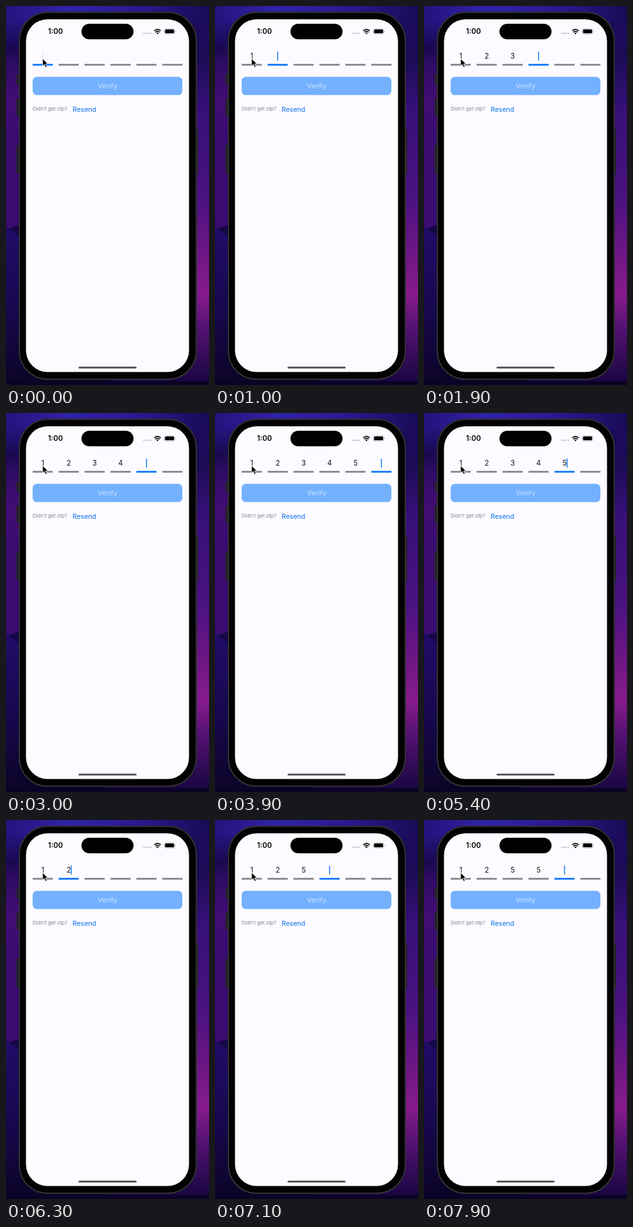
Write an HTML page that moves like this. It is 320 px wide and 598 px high and loops after 8 s.

```html
<!DOCTYPE html>
<html lang="en">
<head>
<meta charset="utf-8">
<title>Code entry</title>
<style>
html, body { margin: 0; width: 100%; height: 100%; overflow: hidden; background: #120638; }
svg { display: block; width: 320px; height: 598px; font-family: Inter, Roboto, sans-serif; }
.mid { text-anchor: middle; }
</style>
</head>
<body>
<svg viewBox="0 0 320 598">
  <defs>
    <linearGradient id="top">
      <stop offset="0" stop-color="#24127c"/>
      <stop offset=".3" stop-color="#3023a6"/>
      <stop offset=".65" stop-color="#2a1a91"/>
      <stop offset="1" stop-color="#190a55"/>
    </linearGradient>
    <linearGradient id="left" x2="0" y2="1">
      <stop offset="0" stop-color="#28188c"/>
      <stop offset=".1" stop-color="#211273"/>
      <stop offset=".19" stop-color="#1a0850"/>
      <stop offset=".25" stop-color="#2c0b62"/>
      <stop offset=".42" stop-color="#420d75"/>
      <stop offset=".59" stop-color="#3a0c70"/>
    </linearGradient>
    <linearGradient id="low" x2="0" y2="1">
      <stop offset="0" stop-color="#210c68"/>
      <stop offset=".5" stop-color="#18084f"/>
      <stop offset="1" stop-color="#0c0427"/>
    </linearGradient>
    <linearGradient id="right" x2="0" y2="1">
      <stop offset="0" stop-color="#1b0b5c"/>
      <stop offset=".14" stop-color="#1c0b56"/>
      <stop offset=".27" stop-color="#361078"/>
      <stop offset=".5" stop-color="#4a1280"/>
      <stop offset=".68" stop-color="#741786"/>
      <stop offset=".76" stop-color="#861b8c"/>
      <stop offset=".85" stop-color="#541273"/>
      <stop offset="1" stop-color="#16063f"/>
    </linearGradient>
  </defs>

  <rect width="320" height="598" fill="url(#low)"/>
  <path d="M0 0H160V300L0 352Z" fill="url(#left)"/>
  <path d="M0 348L24 366V598H0Z" fill="url(#low)"/>
  <rect x="160" width="160" height="598" fill="url(#right)"/>
  <rect width="320" height="26" fill="url(#top)"/>
  <rect y="592" width="320" height="6" fill="#0b0325"/>

  <g fill="#25222b">
    <rect x="16.5" y="108" width="5" height="16" rx="1.5"/>
    <rect x="16.5" y="146" width="5" height="27" rx="1.5"/>
    <rect x="16.5" y="219" width="5" height="45" rx="1.5"/>
    <rect x="298.5" y="194" width="4.5" height="72" rx="1.5"/>
  </g>
  <rect x="20" y="9" width="281" height="581" rx="45" fill="#171619"/>
  <rect x="21.2" y="10.2" width="278.6" height="578.6" rx="44" fill="#020203" stroke="#39383b" stroke-width="1.6"/>
  <rect x="31.5" y="21" width="257" height="556.5" rx="34" fill="#fdfbff"/>
  <rect x="119" y="28" width="82" height="24.5" rx="12.25" fill="#000"/>

  <text class="mid" x="78" y="44.2" font-size="11.3" font-weight="600">1:00</text>
  <g fill="#b9b8bc">
    <circle cx="217.6" cy="43.2" r="1.1"/>
    <circle cx="220.9" cy="43.2" r="1.1"/>
    <circle cx="224.2" cy="43.2" r="1.1"/>
    <circle cx="227.5" cy="43.2" r="1.1"/>
  </g>
  <g fill="none" stroke="#000" stroke-width="1.7">
    <path d="M233.6 39.2Q238.8 34.6 244 39.2"/>
    <path d="M235.4 41.3Q238.8 38.4 242.2 41.3"/>
  </g>
  <path d="M237 42.8Q238.8 41.4 240.6 42.8L238.8 44.8Z"/>
  <rect x="249.6" y="36" width="16.4" height="8.2" rx="2.6" fill="none" stroke="#99989c" stroke-width=".8"/>
  <rect x="250.7" y="37.1" width="14.2" height="6" rx="1.6"/>
  <path d="M267 38.8Q268.4 40.1 267 41.4Z" fill="#99989c"/>

  <g id="cells"></g>
  <rect id="caret" y="71.8" width="1.5" height="14.4" rx=".7" fill="#1478f5"/>

  <rect id="button" x="42" y="111.8" width="236" height="28.8" rx="6.5"/>
  <text id="verify" class="mid" x="160.2" y="130.2" font-size="10.9" font-weight="500">Verify</text>
  <text x="42" y="165.4" font-size="7.9" fill="#858488">Didn't get otp?</text>
  <text x="105" y="166.5" font-size="10.6" fill="#0870e8">Resend</text>
  <rect x="114.3" y="568.9" width="91.6" height="3" rx="1.5" fill="#59585b"/>

  <path d="M57.7 83V94.6L60.4 92.1L62.4 96.8L64.5 95.9L62.5 91.4H66.1Z" stroke="#fff" stroke-width=".8" stroke-linejoin="round"/>
</svg>
<script>
const LOOP = 8000, CELLS = 6, PITCH = 40.88;
// [time, entered digits, whether the caret stays behind the last digit]
const steps = [
  [-680, ''], [700, '1'], [1200, '12'], [1700, '123'], [2500, '1234'],
  [3400, '12345'], [4100, '123456', true],
  [5100, '12345', true], [5600, '1234', true], [5900, '123', true], [6200, '12', true],
  [6900, '125'], [7400, '1255']
];
const el = id => document.getElementById(id);
const add = (tag, attrs) => {
  const node = document.createElementNS('http://www.w3.org/2000/svg', tag);
  for (const key in attrs) node.setAttribute(key, attrs[key]);
  return el('cells').appendChild(node);
};
const center = i => 58 + i * PITCH;
const cells = Array.from({ length: CELLS }, (_, i) => ({
  digit: add('text', { class: 'mid', x: center(i), y: 83.4, 'font-size': 11.3, fill: '#111' }),
  line: add('rect', { x: center(i) - 16, y: 91.4, width: 31.8, height: 2.7 })
}));

// Solid, then fading out and back in once a second.
function blink(age) {
  const p = age % 1000;
  if (p < 550) return 1;
  if (p < 700) return (700 - p) / 150;
  return p < 880 ? 0 : (p - 880) / 120;
}

function draw(t) {
  const [start, code, behind] = steps.findLast(step => step[0] <= t);
  const focus = behind ? code.length - 1 : code.length;
  cells.forEach(({ digit, line }, i) => {
    digit.textContent = code[i] || '';
    line.setAttribute('fill', i === focus ? '#0874fa' : '#838286');
  });
  el('caret').setAttribute('x', center(focus) - .75 + (behind ? 4 : 0));
  el('caret').setAttribute('opacity', blink(t - start));
  const ready = code.length === CELLS;
  el('button').setAttribute('fill', ready ? '#006fff' : '#73b1ff');
  el('verify').setAttribute('fill', ready ? '#fff' : '#c0dcff');
}

function frame() {
  draw(performance.now() % LOOP);
  requestAnimationFrame(frame);
}
frame();
</script>
</body>
</html>
```
